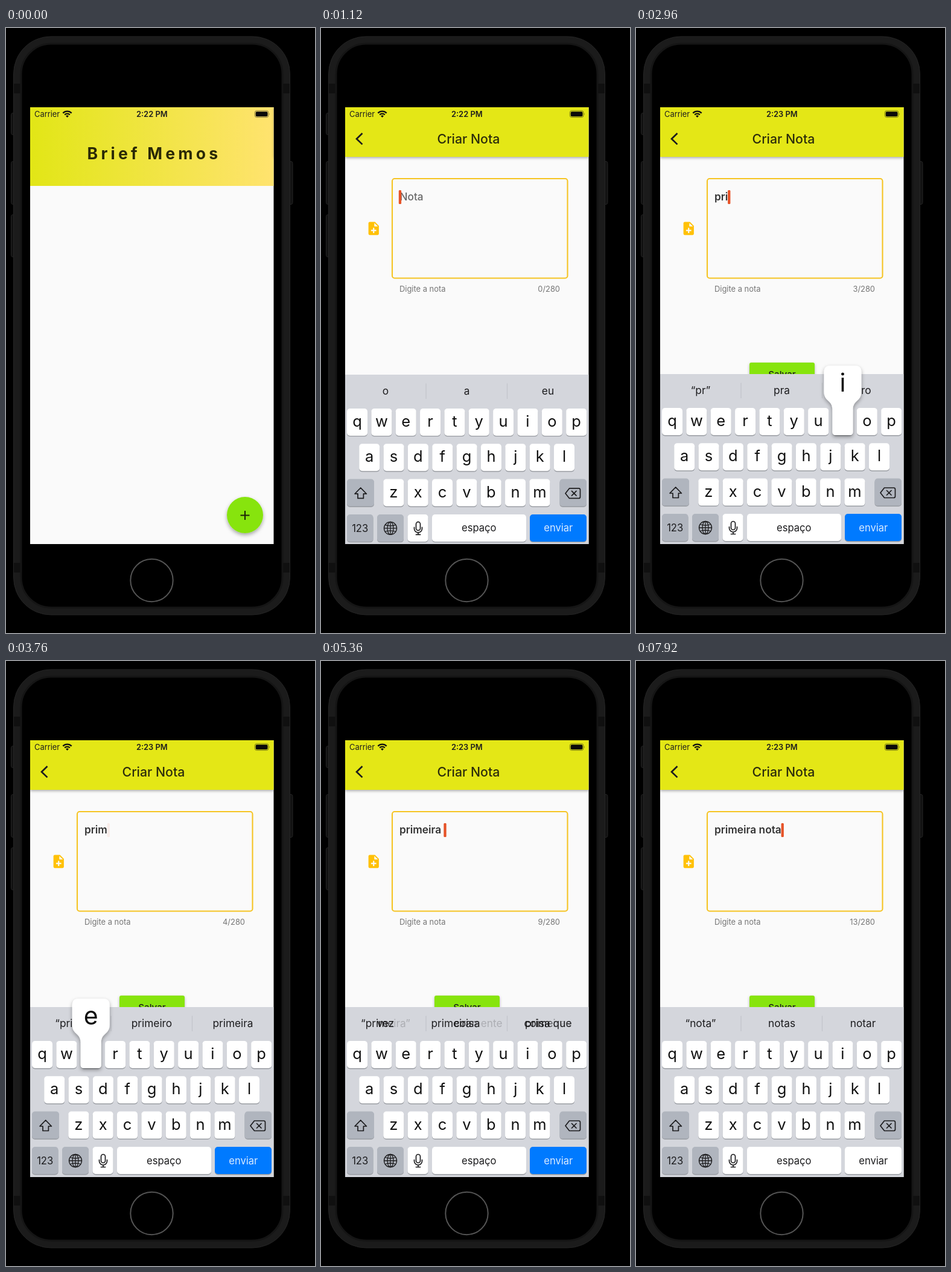
Write an HTML page that moves like this. It is 512 px wide and 1000 px high and loops after 8000 ms.

```html
<!DOCTYPE html>
<html lang="pt">
<head>
<meta charset="utf-8">
<title>Notas</title>
<style>
  html, body { margin: 0; width: 100%; height: 100%; overflow: hidden; background: #000; }
  svg { display: block; width: 100%; height: 100%; }
  text { font-family: Inter, "Liberation Sans", sans-serif; fill: #1c1c1e; white-space: pre; }
  .mid { text-anchor: middle; }
  .status { font-size: 12.9px; }
  .small { font-size: 12.9px; fill: #757575; }
  .label { font-size: 16.6px; }
  .letter { font-size: 25.5px; fill: #111; }
  .hint { font-size: 17.3px; }
  .line { fill: none; stroke: #1c1c1e; stroke-width: 1.7; stroke-linecap: round; stroke-linejoin: round; }
</style>
</head>
<body>
<svg viewBox="0 0 512 1000">
  <defs>
    <clipPath id="screen"><rect x="40" y="131" width="403.5" height="722"/></clipPath>
    <linearGradient id="header"><stop stop-color="#e2e616"/><stop offset="1" stop-color="#ffe36f"/></linearGradient>
    <linearGradient id="fading">
      <stop offset=".5" stop-color="#1c1c1e"/><stop offset=".68" stop-color="#1c1c1e" stop-opacity=".22"/>
    </linearGradient>
    <filter id="drop" x="-30%" y="-30%" width="160%" height="160%">
      <feDropShadow dx="0" dy="3" stdDeviation="3" flood-opacity=".35"/>
    </filter>
    <filter id="bar" x="-5%" y="-10%" width="110%" height="130%">
      <feDropShadow dx="0" dy="2" stdDeviation="2" flood-opacity=".3"/>
    </filter>
  </defs>

  <rect width="512" height="1000"/>
  <g fill="#121212" stroke="#242424">
    <rect x="8.5" y="140.5" width="8" height="36" rx="3"/>
    <rect x="8.5" y="220.5" width="8" height="71" rx="3"/>
    <rect x="8.5" y="308.5" width="8" height="70" rx="3"/>
    <rect x="466" y="220.5" width="9" height="71" rx="3"/>
  </g>
  <rect x="12.5" y="14" width="458" height="956" rx="62" fill="#1b1b1b" stroke="#252525"/>
  <path d="M13 92h13v16h-13zM457 92h13v16h-13zM13 884h13v16h-13zM457 884h13v16h-13z" fill="#101010"/>
  <rect x="25" y="26" width="433" height="932" rx="50" stroke="#151515" stroke-width="3"/>
  <circle cx="241.5" cy="913" r="35.2" fill="none" stroke="#555" stroke-width="2"/>

  <g clip-path="url(#screen)">
    <g id="home">
      <rect x="40" y="131" width="404" height="722" fill="#fafafa"/>
      <rect x="40" y="131" width="404" height="130" fill="url(#header)"/>
      <text class="mid" x="245.5" y="217" font-size="26.6" font-weight="700" letter-spacing="5.2" style="fill:#2a2906">Brief Memos</text>
      <circle cx="396" cy="805" r="30" fill="#87e40b" filter="url(#drop)"/>
      <path d="M388.5 805.500h15M396 798v15" stroke="#1c2408" stroke-width="2.1"/>
    </g>

    <g id="page">
      <rect x="40" y="131" width="404" height="722" fill="#fafafa"/>
      <rect x="40" y="131" width="404" height="82" fill="#e4e719" filter="url(#bar)"/>
      <path class="line" d="M68.500 174L59 183.200L68.500 192.400" style="stroke-width:2.7;stroke-linecap:butt;stroke-linejoin:miter"/>
      <text class="mid" x="244.500" y="191" font-size="21.3" font-weight="500" style="fill:#2c2c0c">Criar Nota</text>
      <path transform="translate(74.3 318.400) scale(1.08)" fill="#ffc107" d="M14 2H6c-1.100 0-2 .9-2 2v16c0 1.100.9 2 2 2h12c1.100 0 2-.9 2-2V8zm2 14h-3v3h-2v-3H8v-2h3v-3h2v3h3zm-3-7V3.500L18.500 9z"/>
      <rect x="118" y="249" width="290.500" height="164.500" rx="4" fill="none" stroke="#f6c423" stroke-width="2.1"/>
      <rect id="mark" x="130" y="268" width="11" height="23" fill="#ebe3a9"/>
      <text id="empty" x="130.500" y="285" font-size="17.2" font-weight="500" style="fill:#686868">Nota</text>
      <text id="note" x="130" y="285" font-size="17.3" font-weight="600" style="fill:#333"></text>
      <rect id="cursor" y="268" width="4.300" height="23" rx="1.500" fill="#e65328"/>
      <text class="small" x="130" y="435.500">Digite a nota</text>
      <text class="small" id="count" x="396" y="435.500" text-anchor="end"></text>
      <g id="save">
        <rect x="188" y="553" width="108" height="39" rx="3" fill="#87e40b" filter="url(#bar)"/>
        <text class="mid" x="242" y="577.500" font-size="15.2" font-weight="500">Salvar</text>
      </g>
    </g>

    <g id="keyboard">
      <rect x="40" y="572" width="404" height="290" fill="#d4d6dc"/>
      <path id="rules" d="M174 586.500v25.500M308.500 586.500v25.500" stroke="#c2c4ca" stroke-width="1.200"/>
      <rect id="pill" x="174" y="578" width="135" height="41" rx="5" fill="#ececee"/>
      <g id="oldHints"></g>
      <g id="newHints"></g>
      <g id="keys"></g>
      <g class="line">
        <path class="line" d="M65.700 759L56 769h5v7.500h9.400v-7.500h5z"/>
        <path class="line" d="M411.500 760h15.500q2.500 0 2.500 2.500v11.500q0 2.500-2.500 2.500h-15.500l-6.500-8.250zM415.500 764.500l7.500 7.500m0-7.500l-7.500 7.500"/>
        <g stroke-width="1.300">
          <circle cx="115" cy="826" r="10.500"/><ellipse cx="115" cy="826" rx="5" ry="10.500"/>
          <path d="M104.500 826h21M115 815.500v21M106.500 820.500q8.500 3 17 0M106.500 831.500q8.500-3 17 0"/>
        </g>
        <rect x="157.500" y="815.500" width="7" height="14" rx="3.500"/>
        <path d="M154.500 824.500v2a6.500 6.500 0 0 0 13 0v-2M161 833v3.500m-3.500 0h7"/>
      </g>
      <g id="popup" filter="url(#drop)">
        <path fill="#fff"/>
        <text class="mid" font-size="41" style="fill:#111"></text>
      </g>
    </g>

    <text class="status" x="47" y="147">Carrier</text>
    <g fill="none" stroke="#111" stroke-width="2.300">
      <path d="M94.300 140.600a10 10 0 0 1 14.400 0M97.200 143.500a6 6 0 0 1 8.600 0"/>
      <path d="M101.500 148l-2.400-2.500a3.400 3.400 0 0 1 4.800 0z" fill="#111" stroke="none"/>
    </g>
    <text class="status mid" id="clock" x="241.800" y="147" font-weight="600"></text>
    <rect x="412.300" y="136.800" width="22.600" height="10.800" rx="3" fill="none" stroke="#111" stroke-opacity=".5"/>
    <rect x="413.700" y="138.200" width="19.800" height="8" rx="1.800" fill="#0a0a0a"/>
    <path d="M436.300 140.300q1.500 1.900 0 3.800z" fill="#111" fill-opacity=".5"/>
  </g>
</svg>

<script>
const LOOP = 8000;
const $ = id => document.getElementById(id);

function add(parent, tag, attrs, content = "") {
  const node = document.createElementNS("http://www.w3.org/2000/svg", tag);
  for (const name in attrs) node.setAttribute(name, attrs[name]);
  node.textContent = content;
  return parent.appendChild(node);
}

// [press time, key, suggestions]
const strokes = [
  [1580, "p", "“p”,o,porque"],
  [2480, "r", "“pr”,pra,pro"],
  [2880, "i", "“pri”,primeiro,primeira"],
  [3280, "m", "“prim”,primeiro,primeira"],
  [3760, "e", "“prime”,primeiro,primeira"],
  [4240, "i", "“primei”,primeiro,primeira"],
  [4480, "r", "“primeir”,primeiro,primeira"],
  [4800, "a", "“primeira”,primeiramente,primeiras"],
  [5120, " ", "vez,coisa,coisa que"],
  [5680, "n", "“n”,não,na"],
  [6080, "o", "“no”,nos,nota"],
  [6560, "t", "“not”,nota,notícia"],
  [7360, "a", "“nota”,notas,notar"]
];
const TYPE_DELAY = 80, HOLD = 130, HINT_DELAY = 80, HINT_FADE = 160;

// [time, opacity]
const blink = [
  [0, 1], [1160, 1], [1360, 0], [1659, 0], [1660, 1], [2120, 1], [2330, 0],
  [2559, 0], [2560, 1], [3400, 1], [3600, .08], [3839, .08], [3840, 1],
  [4120, 1], [4300, .1], [4319, .1], [4320, 1], [7020, 1], [7280, 0],
  [7439, 0], [7440, 1], [LOOP, 1]
];

const keys = {};
function addKey(name, x, y, width, fill = "#fff") {
  add($("keys"), "rect", { x, y: y + 1.4, width, height: 45, rx: 5, fill: "#9a9da3" });
  keys[name] = { x, y, width, face: add($("keys"), "rect", { x, y, width, height: 45, rx: 5, fill }) };
}
function addLabel(x, y, content, cls = "label") {
  return add($("keys"), "text", { x, y, class: cls + " mid" }, content);
}

const PITCH = 40.35, KEY = 34;
["qwertyuiop", "asdfghjkl", "zxcvbnm"].forEach((row, r) => {
  const y = 628 + r * 58.3, first = [60, 80.2, 120.3][r];
  [...row].forEach((letter, i) => {
    const x = first + i * PITCH;
    addKey(letter, x - KEY / 2, y, KEY);
    keys[letter].text = addLabel(x, y + 30, letter, "letter");
  });
});
const GRAY = "#b0b5be";
addKey("shift", 43, 744.6, 45, GRAY);
addKey("delete", 395.5, 744.6, 44.5, GRAY);
addKey("123", 43, 803, 43.5, GRAY);
addKey("globe", 93, 803, 44, GRAY);
addKey("mic", 143.5, 803, KEY);
addKey(" ", 184, 803, 156);
addKey("send", 346, 803, 94);
addLabel(64.7, 832, "123");
addLabel(261.8, 831.5, "espaço");
const sendLabel = addLabel(393.3, 831.5, "enviar");

const hintX = [107, 241.5, 376];
const makeHints = (id, fill) => hintX.map(x =>
  add($(id), "text", { x, y: 605, class: "hint mid", style: "fill:" + fill }));
const oldHints = makeHints("oldHints", "url(#fading)");
const newHints = makeHints("newHints", "#1c1c1e");

const clamp = v => Math.min(1, Math.max(0, v));
const easeOut = (t, start, length) => 1 - (1 - clamp((t - start) / length)) ** 3.5;
const show = (node, on) => node.setAttribute("visibility", on ? "visible" : "hidden");
const shift = (node, x, y) => node.setAttribute("transform", `translate(${x} ${y})`);
const setText = (node, value) => { if (node.textContent !== value) node.textContent = value; };

function sample(table, t) {
  const i = table.findIndex(([time]) => time > t);
  const [t0, a] = table[i - 1], [t1, b] = table[i];
  return a + (b - a) * (t - t0) / (t1 - t0);
}

function balloon({ x, y, width }) {
  const right = x + width, bottom = y + 45, top = y - 70;
  const left = Math.min(x - 14, 440 - 62), edge = left + 62;
  return `M${left + 11} ${top}H${edge - 11}Q${edge} ${top} ${edge} ${top + 11}V${y - 27}` +
    `C${edge} ${y - 10} ${right} ${y - 14} ${right} ${y + 3}V${bottom - 5}Q${right} ${bottom} ${right - 5} ${bottom}` +
    `H${x + 5}Q${x} ${bottom} ${x} ${bottom - 5}V${y + 3}C${x} ${y - 14} ${left} ${y - 10} ${left} ${y - 27}` +
    `V${top + 11}Q${left} ${top} ${left + 11} ${top}Z`;
}

function drawPopup(t) {
  const stroke = strokes.find(([at]) => t >= at && t < at + HOLD);
  const name = stroke && stroke[1], isLetter = !!name && name !== " ";
  for (const k of Object.values(keys)) if (k.text) show(k.text, true);
  show($("popup"), isLetter);
  keys[" "].face.setAttribute("fill", name === " " ? GRAY : "#fff");
  if (!isLetter) return;
  const key = keys[name], [shape, label] = $("popup").children;
  show(key.text, false);
  shape.setAttribute("d", balloon(key));
  label.setAttribute("x", Math.min(key.x - 14, 378) + 31);
  label.setAttribute("y", key.y - 27);
  setText(label, name);
}

function drawHints(t) {
  const sets = [[0, "", "o,a,eu"], ...strokes];
  const n = strokes.filter(([at]) => t >= at + TYPE_DELAY + HINT_DELAY).length;
  const u = n ? clamp((t - sets[n][0] - TYPE_DELAY - HINT_DELAY) / HINT_FADE) : 1;
  const now = sets[n][2].split(","), before = sets[Math.max(0, n - 1)][2].split(",");
  hintX.forEach((_, i) => {
    const same = now[i] === before[i];
    setText(newHints[i], now[i]);
    setText(oldHints[i], before[i]);
    newHints[i].setAttribute("opacity", same ? 1 : clamp(2 * u));
    oldHints[i].setAttribute("opacity", same ? 0 : clamp(2 - 2 * u));
  });
  show($("pill"), n === 1);
  show($("rules"), n !== 1);
}

function render(t) {
  const push = easeOut(t, 700, 400);
  shift($("home"), -134 * push, 0);
  shift($("page"), 404 * (1 - push), 0);
  shift($("keyboard"), 0, 283 * (1 - easeOut(t, 800, 400)));

  const typed = strokes.filter(([at]) => t >= at + TYPE_DELAY).map(s => s[1]).join("");
  setText($("note"), typed);
  setText($("count"), typed.length + "/280");
  show($("empty"), !typed);
  show($("save"), typed);
  show($("mark"), typed.length === 1);
  $("cursor").setAttribute("x", typed ? 129.8 + $("note").getComputedTextLength() : 128.8);
  $("cursor").setAttribute("opacity", sample(blink, t));
  setText($("clock"), t < 2640 ? "2:22 PM" : "2:23 PM");

  drawHints(t);
  drawPopup(t);

  const sending = t >= 7920;
  keys.send.face.setAttribute("fill", sending ? "#fff" : "#007aff");
  sendLabel.style.fill = sending ? "#1c1c1e" : "#d9ebff";
}

function tick() {
  render(performance.now() % LOOP);
  requestAnimationFrame(tick);
}
tick();
</script>
</body>
</html>
```
